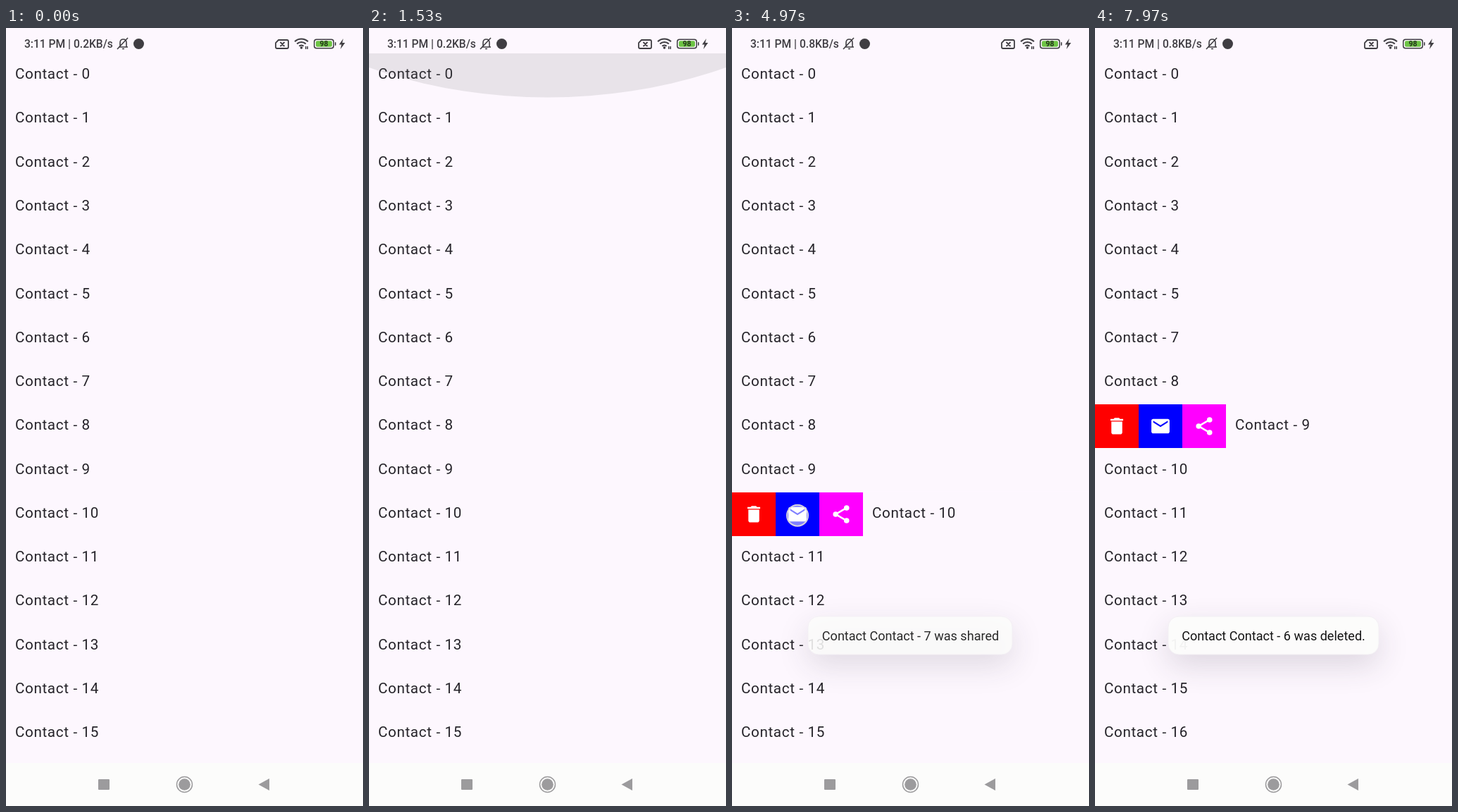
These frames come from a looping animation (507x1104 px, 8 s). An HTML page with a canvas:

```html
<!DOCTYPE html>
<html lang="en">
<head>
<meta charset="utf-8">
<title>Swipe actions</title>
<style>
  html, body { margin: 0; width: 507px; height: 1104px; overflow: hidden; }
  canvas { display: block; }
</style>
</head>
<body>
<canvas id="stage" width="507" height="1104"></canvas>
<script>
const ctx = document.getElementById('stage').getContext('2d');
const LOOP = 8000, AFTER_LOOP = 9000, WIDTH = 507, TOP = 36, BOTTOM = 1043, ROW = 62.27, OPEN = 186;
const SURFACE = '#fdf7fe', INK = '#252329', STATUS = '#3f3d42', NAV = '#9c9b9d';

// contact, slot on screen, swipe start, swipe end, tap time, tapped action (0-2)
const swipes = [
  { contact: 7, slot: 7, from: 2430, to: 2790, tap: 3000, action: 2 },
  { contact: 10, slot: 10, from: 4230, to: 4590, tap: 4970, action: 1 },
  { contact: 6, slot: 6, from: 6000, to: 6360, tap: 6970, action: 0 },
  { contact: 9, slot: 8, from: 7430, to: 7930, tap: AFTER_LOOP }
];
const DELETED = 6, DELETE_TIME = 7060;

const toasts = [
  { from: 3130, to: 5080, x: 108, y: 835, w: 290, h: 54, lines: ['Contact Contact - 7 was shared'] },
  { from: 5100, to: 7040, x: 90, y: 827, w: 326, h: 60, lines: ['Contact Contact - 10 was sent an', 'email.'] },
  { from: 7060, to: AFTER_LOOP, x: 104, y: 835, w: 299, h: 54, lines: ['Contact Contact - 6 was deleted.'] }
];

const trash = new Path2D('M6 19c0 1.1.9 2 2 2h8c1.1 0 2-.9 2-2V7H6v12zM19 4h-3.5l-1-1h-5l-1 1H5v2h14V4z');
const mail = new Path2D('M20 4H4c-1.1 0-2 .9-2 2v12c0 1.1.9 2 2 2h16c1.1 0 2-.9 2-2V6c0-1.1-.9-2-2-2zm0 4l-8 5-8-5V6l8 5 8-5v2z');
const shareLines = new Path2D('M18 5L6 12l12 7');
const bell = new Path2D('M160 27h13M162 27v-6q0-5 4.500-5t4.500 5v6M165 29.500h3M173 14l-15 16');
const boxX = new Path2D('M387 17h12q2 0 2 2v8q0 2-2 2h-14q-2 0-2-2v-6zM389.500 20l6 6M395.500 20l-6 6');
const bolt = new Path2D('M479 15l-6 8.500h3.500l-1.500 6.500 6.500-9h-4z');

const progress = (t, from, to) => Math.min(1, Math.max(0, (t - from) / (to - from)));
const smooth = p => p * p * (3 - 2 * p);
const decelerate = p => 1 - (1 - p) ** 2;

function circle(x, y, r, fill, stroke, width = 1.5) {
  ctx.beginPath();
  ctx.arc(x, y, r, 0, 2 * Math.PI);
  if (fill) { ctx.fillStyle = fill; ctx.fill(); }
  if (stroke) { ctx.strokeStyle = stroke; ctx.lineWidth = width; ctx.stroke(); }
}

function rect(x, y, w, h, color, radius = 0) {
  ctx.beginPath();
  ctx.roundRect(x, y, w, h, radius);
  ctx.fillStyle = color;
  ctx.fill();
}

function text(value, x, y, font, color, align = 'left', spacing = 0) {
  ctx.font = font + ' Roboto, sans-serif';
  ctx.letterSpacing = spacing + 'px';
  ctx.textAlign = align;
  ctx.fillStyle = color;
  ctx.fillText(value, x, y);
}

const pointer = (x, y) => circle(x, y, 15, 'rgba(255,255,255,.5)', '#d8d3de', 2);

function scrollAt(t) {
  const peak = 363.5;
  return t < 960 ? peak * smooth(progress(t, 30, 930))
                 : peak * (1 - progress(t, 960, 1400) ** 1.6);
}

function swipeOffset(s, t) {
  if (s.action === 0 && t >= DELETE_TIME) return 0;
  return OPEN * (smooth(progress(t, s.from, s.to)) - smooth(progress(t, s.tap + 90, s.tap + 390)));
}

function drawActions(y) {
  ['#f00', '#00f', '#f0f'].forEach((color, i) => {
    rect(i * 62, y, 62, 62, color);
    ctx.save();
    ctx.translate(i * 62 + 15.5, y + 15.5);
    ctx.scale(1.291, 1.291);
    ctx.fillStyle = ctx.strokeStyle = '#fff';
    if (i < 2) ctx.fill(i ? mail : trash);
    else {
      ctx.lineWidth = 2;
      ctx.stroke(shareLines);
      for (const [x, cy] of [[18, 5], [6, 12], [18, 19]]) circle(x, cy, 2.95, '#fff');
    }
    ctx.restore();
  });
}

function drawList(t) {
  const scroll = scrollAt(t);
  for (let slot = 0; slot < 24; slot++) {
    const contact = t >= DELETE_TIME && slot >= DELETED ? slot + 1 : slot;
    const y = TOP + slot * ROW - scroll;
    const swipe = swipes.find(s => s.contact === contact && t > s.from);
    const offset = swipe ? swipeOffset(swipe, t) : 0;
    if (offset > 0) {
      drawActions(Math.round(y));
      rect(offset, y - 1, WIDTH, ROW + 2, SURFACE);
    }
    text('Contact - ' + contact, 12.9 + offset, y + 36.2, '20.66px', INK, 'left', 0.646);
  }
}

function drawGlow(t) {
  const grow = decelerate(progress(t, 1400, 1600));
  const strength = grow * (1 - decelerate(progress(t, 1600, 2200)));
  if (strength <= 0) return;
  const r = WIDTH * 1.2, depth = r * (1 - Math.cos(Math.PI / 6));
  ctx.save();
  ctx.translate(WIDTH / 2, TOP);
  ctx.scale(1, 0.87 * strength);
  circle(0, depth - r, r, `rgba(102,102,102,${0.15 * strength})`);
  ctx.restore();
}

function drawPointer(t) {
  if (t >= 30 && t < 1250) pointer(325, 842 - scrollAt(t));
  for (const s of swipes) {
    const y = TOP + s.slot * ROW;
    if (t >= s.from && t < s.from + (s.to - s.from) * 0.75) pointer(184 + swipeOffset(s, t), y + 48);
    if (t >= s.tap && t < s.tap + 90) pointer(31 + 62 * s.action, y + 33);
  }
}

function drawToast({ from, to, x, y, w, h, lines }, t) {
  const alpha = smooth(progress(t, from, from + 200)) * (1 - progress(t, to - 120, to));
  if (alpha <= 0) return;
  ctx.save();
  ctx.globalAlpha = alpha;
  ctx.shadowColor = 'rgba(50,45,65,.17)';
  ctx.shadowBlur = 44;
  ctx.shadowOffsetY = 15;
  rect(x, y, w, h, 'rgba(253,253,252,.95)', 15);
  ctx.shadowColor = 'transparent';
  ctx.strokeStyle = '#f3f0f4';
  ctx.lineWidth = 1;
  ctx.stroke();
  lines.forEach((line, i) => {
    const baseline = y + h / 2 + 6.6 + (i - (lines.length - 1) / 2) * 22;
    text(line, WIDTH / 2, baseline, '18.07px', '#141414', 'center');
  });
  ctx.restore();
}

function drawStatus(t) {
  text(`3:11 PM | ${t < 4100 ? '0.2' : '0.8'}KB/s`, 26, 28.3, '500 15.6px', STATUS);
  ctx.strokeStyle = STATUS;
  ctx.lineWidth = 1.6;
  ctx.stroke(bell);
  circle(188.5, 22.5, 7.5, STATUS);
  ctx.strokeStyle = STATUS;
  ctx.lineWidth = 1.8;
  ctx.stroke(boxX);

  ctx.lineWidth = 2.2;
  for (const r of [4.5, 9, 13.5]) {
    ctx.beginPath();
    ctx.arc(419.5, 29, r, -2.34, -0.8);
    ctx.stroke();
  }
  circle(419.5, 28, 1.8, STATUS);
  rect(425, 26, 1.5, 4, STATUS);
  rect(427.5, 26, 1.5, 4, STATUS);

  rect(437, 15.5, 29, 14, STATUS, 4);
  rect(438.5, 17, 26, 11, SURFACE, 3);
  rect(440, 18.3, 23, 8.4, '#6dc444', 2);
  rect(467, 20, 1.6, 5, STATUS, 1);
  text('98', 451.5, 26.3, '700 10.5px', '#25351d', 'center');
  ctx.fillStyle = STATUS;
  ctx.fill(bolt);
}

function drawNav() {
  rect(0, BOTTOM, WIDTH, 61, '#fcfcfb');
  rect(131, 1066, 16, 15, NAV, 1);
  circle(253.5, 1073.5, 8.3, NAV);
  circle(253.5, 1073.5, 11, null, NAV, 1.5);
  ctx.beginPath();
  ctx.moveTo(358.5, 1073.5);
  ctx.lineTo(374, 1065);
  ctx.lineTo(374, 1082);
  ctx.fillStyle = NAV;
  ctx.fill();
}

function draw(now) {
  const t = now % LOOP;
  rect(0, 0, WIDTH, 1104, SURFACE);
  ctx.save();
  ctx.beginPath();
  ctx.rect(0, TOP, WIDTH, BOTTOM - TOP);
  ctx.clip();
  drawList(t);
  drawGlow(t);
  ctx.restore();
  drawStatus(t);
  drawNav();
  for (const toast of toasts) drawToast(toast, t);
  drawPointer(t);
}

const start = performance.now();
function tick() {
  draw(performance.now() - start);
  requestAnimationFrame(tick);
}
tick();
</script>
</body>
</html>
```
